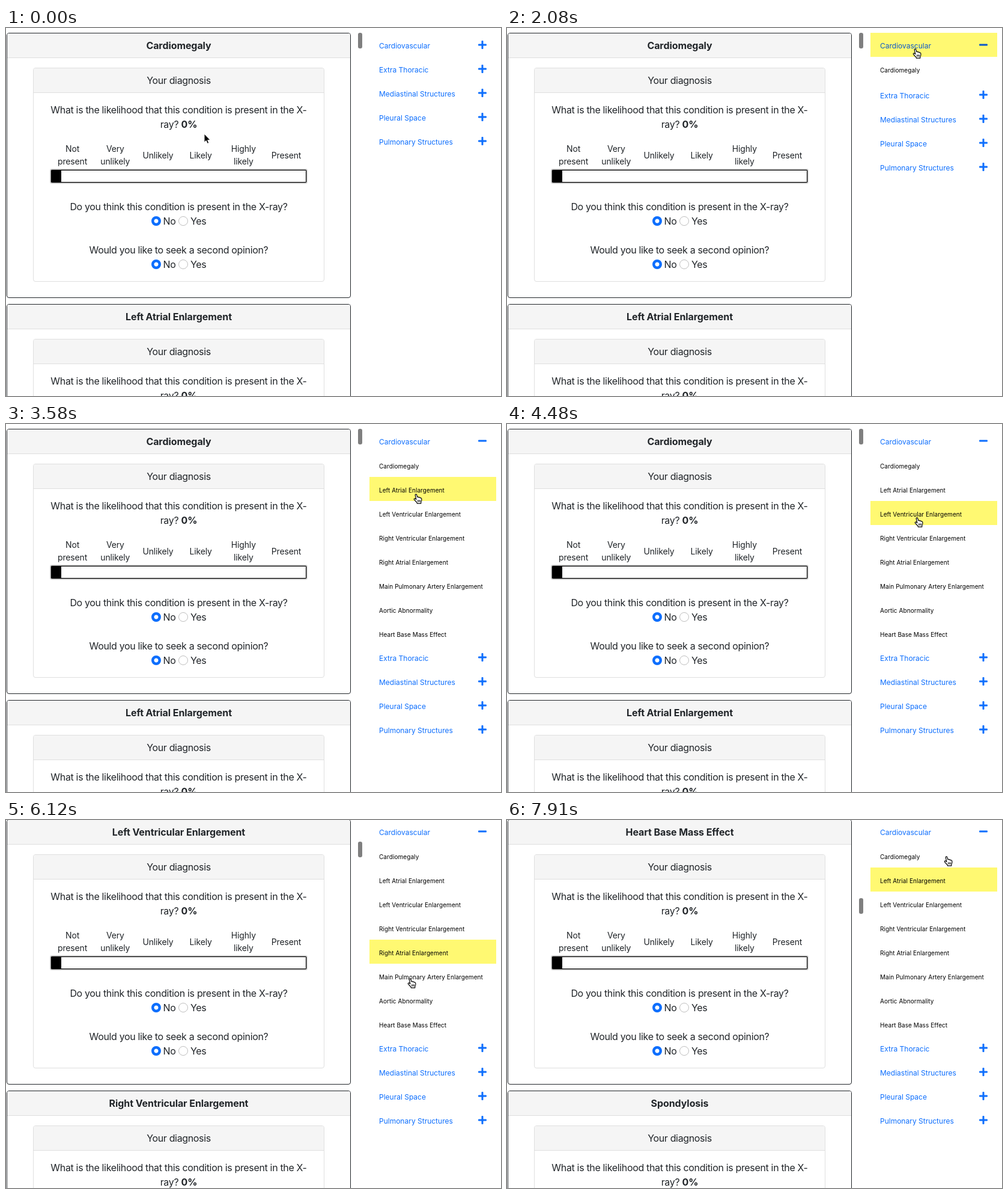
An HTML page that plays this animation: 824 by 612 pixels, repeating every 8000 ms.

```html
<!DOCTYPE html>
<html lang="en">
<head>
<meta charset="utf-8">
<title>Diagnosis form</title>
<style>
* { box-sizing: border-box; }
html, body { margin: 0; width: 100%; height: 100%; overflow: hidden; background: #fff; }
body {
  position: relative; color: #212529;
  font: 16px/24px Inter, "Liberation Sans", sans-serif;
  font-optical-sizing: none; letter-spacing: -.34px;
}
#page, #cards, #thumb, #menu, #cursor { position: absolute; }
#page { left: 0; top: 0; width: 824px; height: 640px; }
#cards { left: 1px; top: 8px; width: 573px; }
#thumb { left: 586px; top: 8px; width: 7px; height: 26px; border-radius: 3px; background: #7f7f7f; }

.card { height: 441px; margin-bottom: 10px; border: 1px solid #212529; border-radius: 4px; text-align: center; }
.head { height: 41px; padding: 8px; background: #f5f5f5; border-bottom: 1px solid #dfdfdf; border-radius: 3px 3px 0 0; }
.card > .head, b { font-weight: 700; letter-spacing: -.08px; }
.inner { width: 485px; height: 356px; margin: 16px 0 0 43px; border: 1px solid #dfdfdf; border-radius: 4px; }
.body { padding: 16px; }
.scale {
  display: grid; grid-template-columns: repeat(6, 71.2px); align-items: center;
  height: 42px; margin: 18px 0 4px 13px; font-size: 14px; line-height: 21px; letter-spacing: -.17px;
}
.slider {
  width: 425px; height: 21px; margin: 0 0 28px 13px; border: 1px solid #000; border-radius: 1px;
  background: linear-gradient(#000, #000) 0 0 / 16px 100% no-repeat #fff;
  box-shadow: 0 0 2px 1px #0008;
}
.radios { display: grid; grid-template-columns: 19.5px 25.5px 20px auto; padding-left: 180px; margin-bottom: 24px; text-align: left; }
.radios i { width: 16px; height: 16px; margin-top: 4px; border: 1px solid #bfbfbf; border-radius: 50%; }
.radios .on { border: 0; background: radial-gradient(#fff 3.1px, #0d6efd 3.9px); }

#menu { left: 605px; top: 8px; width: 211px; }
#subs { overflow: hidden; }
.row { position: relative; height: 40px; padding: 8px 16px; white-space: nowrap; color: #000; }
.row span { font-size: 10px; letter-spacing: .07px; }
.cat { color: #0d6efd; }
.cat span { font-size: 12px; letter-spacing: 0; }
.row.lit { background: #fff972; }
.cat.lit { color: #0a58ca; }
.row svg { position: absolute; left: 180px; top: 12px; fill: currentColor; }
#cursor { left: 0; top: 0; overflow: visible; pointer-events: none; }
</style>
</head>
<body>
<div id="page">
  <div id="cards"></div>
  <div id="thumb"></div>
  <div id="menu"></div>
</div>
<svg id="cursor" width="18" height="20" stroke-linejoin="round">
  <path id="arrow" d="M0 0V14.2L3.2 11.3 5.3 16.2 7.7 15.2 5.6 10.4H10Z" fill="#000" stroke="#fff"/>
  <g id="hand" fill="#fff" stroke="#000" stroke-width="1.2">
    <path d="M3.2 2.2C3 .6 5.2.3 5.7 1.8L6.8 5.6C7.6 4.9 9 5.2 9.2 6.3 10 5.6 11.3 6 11.5 7.1 12.3 6.6 13.6 7 13.8 8.3 14.2 10.4 13.9 12.2 12.9 13.8L12.7 16.2H6.3L6 14.6C4.6 13 3 11.6 1.6 9.8.6 8.4 2.2 7.4 3.4 8.3L4.8 9.6Z"/>
    <path d="M7.6 10.4V13.6M9.5 10.4V13.6M11.4 10.4V13.6" stroke-width="1"/>
  </g>
</svg>
<script>
const $ = id => document.getElementById(id);
const conditions = ['Cardiomegaly', 'Left Atrial Enlargement', 'Left Ventricular Enlargement',
  'Right Ventricular Enlargement', 'Right Atrial Enlargement', 'Main Pulmonary Artery Enlargement',
  'Aortic Abnormality', 'Heart Base Mass Effect'];
const categories = ['Extra Thoracic', 'Mediastinal Structures', 'Pleural Space', 'Pulmonary Structures'];
const levels = ['Not<br>present', 'Very<br>unlikely', 'Unlikely', 'Likely', 'Highly<br>likely', 'Present'];

const radios = '<div class="radios"><i class="on"></i><span>No</span><i></i><span>Yes</span></div>';
const card = title => `<div class="card"><div class="head">${title}</div>
  <div class="inner"><div class="head">Your diagnosis</div><div class="body">
    What is the likelihood that this condition is present in the X-<br>ray? <b>0%</b>
    <div class="scale">${levels.map(l => `<div>${l}</div>`).join('')}</div>
    <div class="slider"></div>
    Do you think this condition is present in the X-ray?${radios}
    Would you like to seek a second opinion?${radios}
  </div></div></div>`;
const row = name => `<div class="row"><span>${name}</span></div>`;
const category = name => `<div class="row cat"><span>${name}</span><svg width="16" height="16">
  <rect x="1" y="6.5" width="14" height="3" rx="1"/><rect class="bar" x="6.5" y="1" width="3" height="14" rx="1"/></svg></div>`;

$('cards').innerHTML = [...conditions, 'Spondylosis'].map(card).join('');
$('menu').innerHTML = category('Cardiovascular') +
  `<div id="subs">${conditions.map(row).join('')}</div>` + categories.map(category).join('');
const rows = [...document.querySelectorAll('.row')];
const firstBar = document.querySelector('.bar');

// The screen refreshes in ticks; all times below are counted in them.
const TICK = 149;
const progress = (n, from, to) => Math.min(1, Math.max(0, (n - from) / (to - from)));
const smooth = p => p * p * (3 - 2 * p);

// Pointer moves: start, end, x, y
const moves = [
  [0, 1, 399, 165], [3, 6, 600, 72], [6, 8, 656, 49], [9, 11, 675, 34], [18, 24, 678, 116],
  [28, 30, 678, 155], [37, 43, 661, 345], [51, 52, 712, 110], [52, 53, 727, 60]
];

function pointerAt(n) {
  let x = 330, y = 176;
  for (const [from, to, endX, endY] of moves) {
    const p = progress(n, from, to) ** 1.4;
    x += (endX - x) * p;
    y += (endY - y) * p;
  }
  return [x, y];
}

function draw() {
  const n = Math.floor((performance.now() % 8000 + 10) / TICK);
  const topCard = n < 32 ? 0 : n < 46 ? 2 : 7;
  const offset = topCard * 451;
  const open = smooth(progress(n, 13.4, 16));
  $('page').style.transform = `translateY(${topCard ? -9 : 0}px)`;
  $('cards').style.transform = `translateY(${-offset}px)`;
  $('thumb').style.transform = `translateY(${Math.round(offset * .0415)}px)`;
  $('subs').style.height = Math.round(320 * open) + 'px';
  firstBar.style.display = open ? 'none' : '';

  // The highlight trails the pointer by one tick.
  const hovered = document.elementFromPoint(...pointerAt(n - 1))?.closest('.row');
  rows.forEach(r => r.classList.toggle('lit', r === hovered));

  const [x, y] = pointerAt(n);
  const hand = x >= 605;
  $('arrow').style.display = hand ? 'none' : '';
  $('hand').style.display = hand ? '' : 'none';
  $('cursor').style.transform = `translate(${Math.round(x)}px, ${Math.round(y)}px)`;
  requestAnimationFrame(draw);
}
draw();
</script>
</body>
</html>
```
